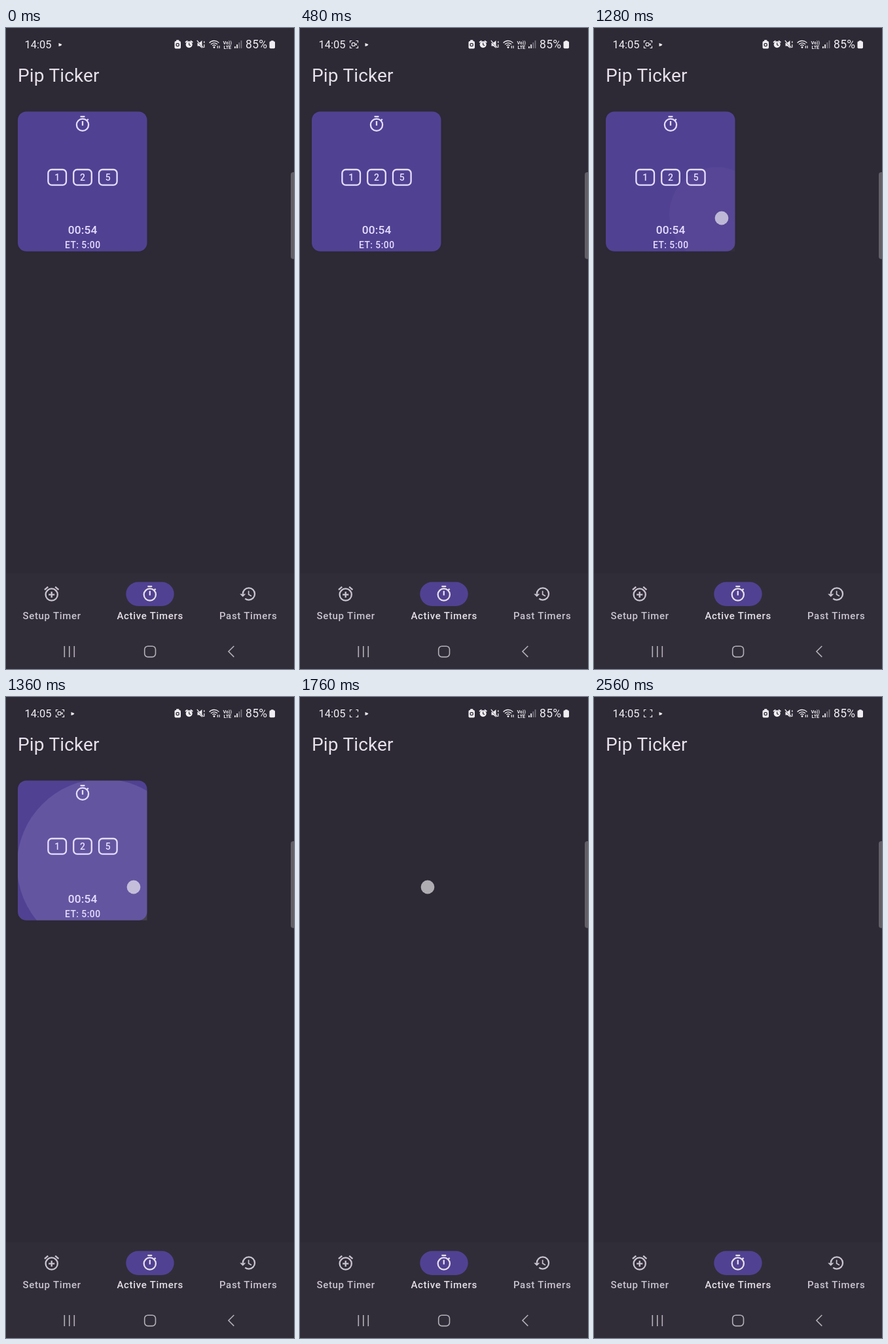
Animation, 440 px wide and 978 px high, one loop 2.64 s. Source, as an HTML page with a canvas:

```html
<!DOCTYPE html>
<html lang="en">
<head>
<meta charset="utf-8">
<title>Active Timers</title>
<style>
  html, body { margin: 0; width: 100%; height: 100%; overflow: hidden; background: #2d2935; }
  canvas { display: block; width: 440px; height: 978px; }
</style>
</head>
<body>
<canvas id="stage"></canvas>
<script>
const W = 440, H = 978, LOOP = 2640, STEP = 80;
const BG = '#2d2935', NAV = '#312d38', PURPLE = '#514192';
const LIGHT = '#e6deff', TEXT = '#e6e1e9', MUTED = '#c9c4d0', SYSTEM = '#b3b0b8', STATUS = '#f0eef2';
const DIM = '#77737d';
const CARD = { x: 18, y: 127.5, w: 197.5, h: 213.2 };
const TOUCH = { x: 195, y: 290 };

const canvas = document.getElementById('stage');
const ctx = canvas.getContext('2d');
const dpr = window.devicePixelRatio || 1;
canvas.width = W * dpr;
canvas.height = H * dpr;

const lerp = (a, b, p) => a + (b - a) * p;
const clamp = p => Math.max(0, Math.min(1, p));

function text(str, x, y, size, { weight = 400, color = TEXT, align = 'left', spacing = 0 } = {}) {
  ctx.font = `${weight} ${size}px Roboto, sans-serif`;
  ctx.letterSpacing = spacing + 'px';
  ctx.textAlign = align;
  ctx.fillStyle = color;
  // trailing letter space would shift centred text
  ctx.fillText(str, align === 'center' ? x + spacing / 2 : x, y);
  ctx.letterSpacing = '0px';
}

function rect(x, y, w, h, r, color) {
  ctx.fillStyle = color;
  ctx.beginPath();
  ctx.roundRect(x, y, w, h, r);
  ctx.fill();
}

function outline(x, y, w, h, r, color, width) {
  ctx.strokeStyle = color;
  ctx.lineWidth = width;
  ctx.beginPath();
  ctx.roundRect(x, y, w, h, r);
  ctx.stroke();
}

function disc(x, y, r, color) {
  ctx.fillStyle = color;
  ctx.beginPath();
  ctx.arc(x, y, r, 0, 7);
  ctx.fill();
}

function line(color, width, ...pts) {
  ctx.strokeStyle = color;
  ctx.lineWidth = width;
  ctx.beginPath();
  for (let i = 0; i < pts.length; i += 2) ctx.lineTo(pts[i], pts[i + 1]);
  ctx.stroke();
}

function polygon(color, ...pts) {
  ctx.fillStyle = color;
  ctx.beginPath();
  for (let i = 0; i < pts.length; i += 2) ctx.lineTo(pts[i], pts[i + 1]);
  ctx.fill();
}

function arc(color, width, x, y, r, from = 0, to = Math.PI * 2) {
  ctx.strokeStyle = color;
  ctx.lineWidth = width;
  ctx.beginPath();
  ctx.arc(x, y, r, from, to);
  ctx.stroke();
}

// Icons are drawn on a 24-unit grid centred on (x, y).
function icon(draw, x, y, color, scale = 1.14) {
  ctx.save();
  ctx.translate(x, y);
  ctx.scale(scale, scale);
  ctx.translate(-12, -12);
  draw(color);
  ctx.restore();
}

function stopwatch(c) {
  arc(c, 2, 12, 13, 8);
  line(c, 2, 9, 2, 15, 2);
  line(c, 2, 12, 8, 12, 14);
  line(c, 2, 17.6, 7.4, 19.7, 5.3);
}

function alarmAdd(c) {
  arc(c, 2, 12, 13, 8);
  line(c, 2, 7.2, 2.6, 2.6, 6.5);
  line(c, 2, 16.8, 2.6, 21.4, 6.5);
  line(c, 2, 8, 13, 16, 13);
  line(c, 2, 12, 9, 12, 17);
}

function history(c) {
  arc(c, 2, 13, 12, 8, Math.PI, Math.PI * 2 + 2.24);
  polygon(c, 1, 12, 9, 12, 5, 16);
  line(c, 1.5, 12.75, 8, 12.75, 12.7, 16.6, 15);
}

function recorder(showCamera) {
  for (const sx of [-1, 1]) for (const sy of [-1, 1]) {
    const x = 82.5 + sx * 6, y = 25 + sy * 5.5;
    line(STATUS, 1.2, x - sx * 3, y, x, y, x, y - sy * 3);
  }
  if (!showCamera) return;
  outline(79.3, 22.6, 4.6, 4.8, 1, STATUS, 1.2);
  polygon(STATUS, 84.2, 25, 86.6, 23, 86.6, 27);
}

function notice(x) {
  polygon(STATUS, x - 2.5, 23, x + 2.5, 25, x + 1, 27, x - 2.5, 28);
}

function statusBar(t) {
  text('14:05', 28.5, 30.5, 16.5, { color: STATUS });
  if (t < STEP) notice(83);
  else {
    recorder((t - 80) % 960 < 480);
    notice(102);
  }

  // battery care
  rect(257.5, 20, 9.5, 11.5, 2, STATUS);
  rect(260, 18.3, 4.5, 2.5, 1, STATUS);
  outline(260.2, 23.6, 4, 4, 1, BG, 1.3);

  // alarm
  disc(279.7, 25.3, 5, STATUS);
  line(STATUS, 1.8, 274, 22, 277.5, 19.5);
  line(STATUS, 1.8, 285.4, 22, 281.9, 19.5);
  line(BG, 1.2, 279.7, 22.5, 279.7, 25.6, 282, 26.8);

  // muted speaker
  polygon(STATUS, 292.5, 22.5, 295.5, 22.5, 299.5, 19, 299.5, 31, 295.5, 27.5, 292.5, 27.5);
  line(BG, 1.2, 292, 20, 302, 31);
  line(STATUS, 1.2, 291.8, 19, 301.5, 30);
  line(STATUS, 1.2, 302.8, 20, 302.8, 23);
  line(STATUS, 1.2, 302.8, 25, 302.8, 30);

  // wireless
  for (const r of [3.5, 6.7, 10]) arc(STATUS, 1.3, 318, 29.5, r, -2.4, -0.75);
  disc(318, 29.5, 1.4, STATUS);
  line(STATUS, 1.2, 323.3, 27, 323.3, 31);
  line(STATUS, 1.2, 326, 27, 326, 31);

  text('Vo))', 338.3, 24.5, 7.2, { weight: 700, color: STATUS, align: 'center' });
  text('LTE', 338.3, 32, 7.2, { weight: 700, color: STATUS, align: 'center' });

  // signal
  for (let i = 0; i < 4; i++) {
    const h = 3 + i * 3;
    rect(349 + i * 3.2, 31 - h, 1.8, h, 0.5, i < 2 ? STATUS : DIM);
  }

  text('85%', 366, 30.5, 17.5, { color: STATUS, spacing: 0.3 });
  rect(402.5, 20.3, 8.5, 11, 1.8, STATUS);
  rect(404.8, 19.2, 4, 2, 0.8, STATUS);
}

function ripple(t) {
  if (t < 1270) return;
  const p = clamp((t - 1265) / 160);
  const grow = p * p * (3 - 2 * p);
  const x = lerp(TOUCH.x, CARD.x + CARD.w / 2, p);
  const y = lerp(TOUCH.y, CARD.y + CARD.h / 2, p);
  ctx.save();
  ctx.beginPath();
  ctx.rect(CARD.x, CARD.y, CARD.w, CARD.h);
  ctx.clip();
  const alpha = 0.125 * clamp((t - 1260) / 75);
  disc(x, y, lerp(66, 156, Math.pow(grow, 0.7)), `rgba(230,222,255,${alpha})`);
  ctx.restore();
}

function card(t) {
  rect(CARD.x, CARD.y, CARD.w, CARD.h, 13, PURPLE);
  icon(stopwatch, 117, 146.6, LIGHT);
  ['1', '2', '5'].forEach((label, i) => {
    const x = 78.2 + i * 38.8;
    outline(x - 13.8, 216, 27.6, 23.6, 5.5, LIGHT, 2.3);
    text(label, x, 233, 14, { weight: 500, color: LIGHT, align: 'center' });
  });
  text('00:54', 117, 313.5, 17.3, { weight: 500, color: LIGHT, align: 'center', spacing: 0.2 });
  text('ET: 5:00', 117, 335.5, 13.8, { weight: 500, color: LIGHT, align: 'center', spacing: 0.5 });
  ripple(t);
}

function bottomBar() {
  rect(0, 832, W, H - 832, 0, NAV);
  rect(183.3, 845.3, 73.4, 36.6, 18.3, PURPLE);
  const tabs = [
    ['Setup Timer', 69.7, alarmAdd, MUTED],
    ['Active Timers', 219.8, stopwatch, TEXT],
    ['Past Timers', 369.8, history, MUTED]
  ];
  for (const [label, x, draw, color] of tabs) {
    icon(draw, x, 863.4, color);
    text(label, x, 902, 15, { weight: 500, color, align: 'center', spacing: 0.65 });
  }

  for (const x of [89.3, 96.8, 104.3]) line(SYSTEM, 1.6, x, 943, x, 960);
  outline(211.7, 943.2, 16.8, 16.4, 5, SYSTEM, 1.6);
  line(SYSTEM, 1.6, 348.3, 943, 340, 951.3, 348.3, 959.6);
}

function render(t) {
  ctx.setTransform(dpr, 0, 0, dpr, 0, 0);
  rect(0, 0, W, H, 0, BG);
  statusBar(t);
  text('Pip Ticker', 18, 81.5, 28, { spacing: 0.1 });
  if (t < 1760) card(t);
  if (t >= 1200 && t < 1840) disc(TOUCH.x, TOUCH.y, 10.4, 'rgba(255,255,255,0.62)');
  rect(435, 220, 10, 132.5, 4, '#625f67');
  bottomBar();
}

function tick() {
  const t = performance.now() % LOOP;
  render(Math.floor(t / STEP) * STEP);
  requestAnimationFrame(tick);
}
tick();
</script>
</body>
</html>
```
